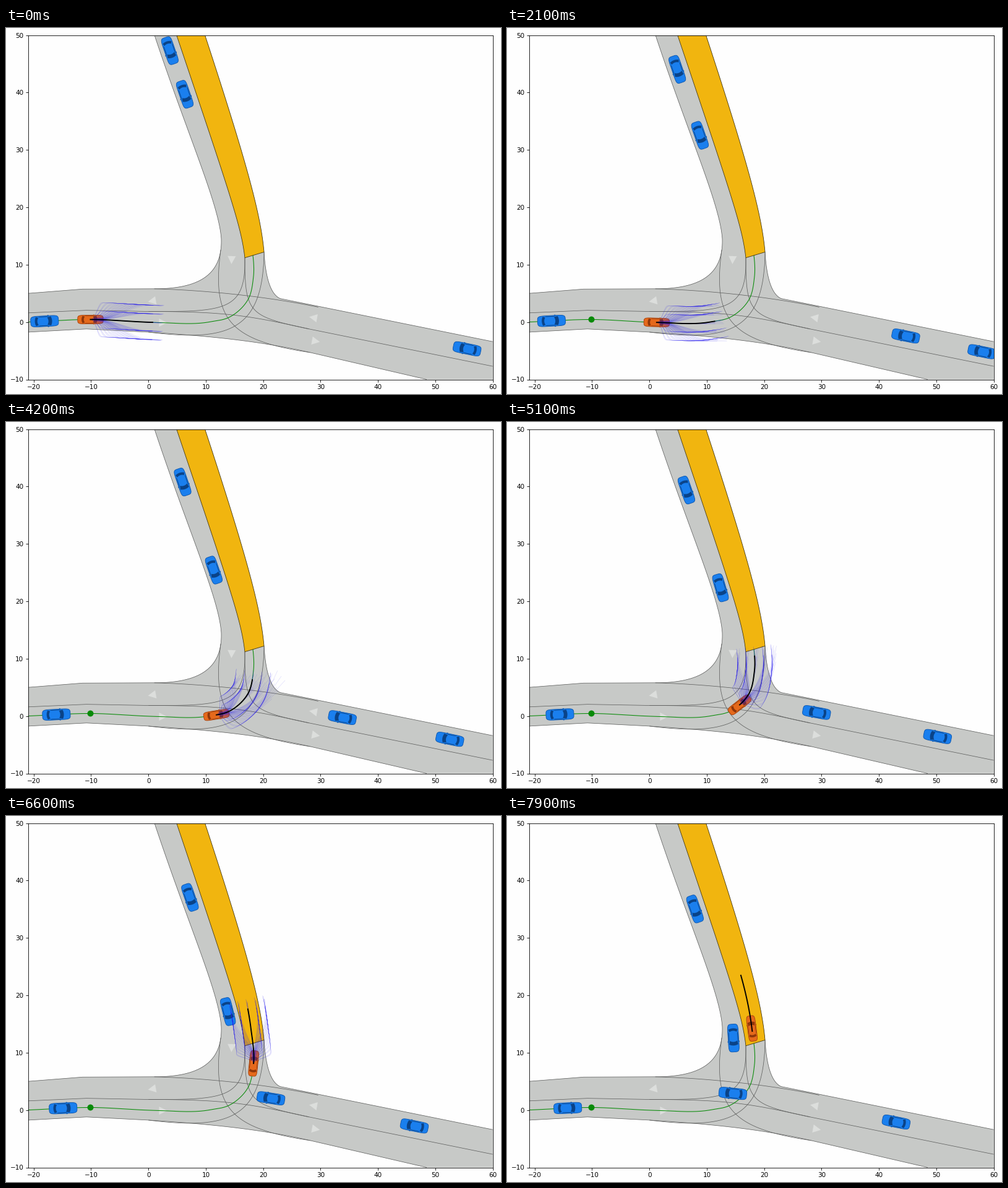
A matplotlib script for the animation above (8 s loop, 800 by 592 pixels).

```python
import numpy as np
import matplotlib.pyplot as plt
from matplotlib.animation import FuncAnimation
from matplotlib.collections import LineCollection
from matplotlib.patches import Polygon
from matplotlib.transforms import Affine2D

FRAMES, STEP = 80, 0.1
REPLAN, HORIZON = 3, 2.0
PX = 72 / 80  # points per pixel

plt.rcParams.update({"font.family": "DejaVu Sans", "font.size": 10.4 * PX})
fig = plt.figure(figsize=(10, 7.4), dpi=80, facecolor="#fefefe")
ax = fig.add_axes([35.5 / 800, 23.5 / 592, 751 / 800, 557 / 592], facecolor="#fefefe")
ax.set(xlim=(-21, 60), ylim=(-10, 50), xticks=range(-20, 61, 10), yticks=range(-10, 51, 10))
ax.tick_params(length=3.6 * PX, pad=3.6 * PX, width=0.85 * PX)
for spine in ax.spines.values():
    spine.set(linewidth=0.85 * PX, zorder=50)


def bezier(*ctrl, n=50):
    """Cubic Bezier curve as an array of points."""
    a, b, c, d = np.array(ctrl, float)
    u = np.linspace(0, 1, n)[:, None]
    return (1 - u) ** 3 * a + 3 * u * (1 - u) ** 2 * b + 3 * u * u * (1 - u) * c + u ** 3 * d


def route(*pts):
    """Smooth curve through pts, as a function of the distance travelled."""
    pts = np.array(pts, float)
    keys = np.r_[0, np.cumsum(np.hypot(*np.diff(pts, axis=0).T))]
    slope = np.gradient(pts, keys, axis=0)
    spans = zip(np.diff(keys)[:, None], pts, pts[1:], slope, slope[1:])
    curve = np.vstack([bezier(p, p + h * m / 3, q - h * k / 3, q, n=120)[:-1]
                       for h, p, q, m, k in spans] + [pts[-1:]])
    dist = np.r_[0, np.cumsum(np.hypot(*np.diff(curve, axis=0).T))]
    return lambda s: np.column_stack([np.interp(s, dist, c) for c in curve.T])


# Road borders
west_top = [(-21, 5), (-11.5, 5.75), (1, 5.8)]
west_mid = [(-21, 1.6), (-10.8, 2.05), (0, 1.85)]
west_low = [(0, -1.75), (-10.8, -1.2), (-21, -1.75)]
north_left = bezier((12.7, 14.5), (12.3, 20.5), (7.05, 32), (1.05, 50))
north_mid = bezier((16.8, 11.2), (16.2, 16.5), (14.5, 21.5), (4.9, 50))
north_right = bezier((20.15, 12.2), (19.6, 18.5), (17.4, 27), (9.85, 50))
nw_corner = bezier((1, 5.8), (8.5, 5.8), (12.9, 8), (12.7, 14.5))
ne_corner = bezier((20.15, 12.2), (20.4, 8), (21.2, 4.9), (22.95, 4.1))
east_top = [(22.95, 4.1), (60, -3.4)]
east_low = np.vstack([(48.5, -10), bezier((28.2, -5.3), (19, -3.2), (10, -2.4), (0, -1.75))])
through = np.vstack([west_mid, bezier((0, 1.85), (14, 1.85), (18, 1), (28, -1.2)), (60, -7.7)])

# Turning lanes across the junction
turns = [
    bezier((1, 5.8), (9, 5.6), (20, 4.6), (29.6, 2.6)),
    bezier((0, 1.85), (13.5, 1.8), (17, 2), (16.8, 11.2)),
    bezier((0, -1.75), (14, -3.5), (20, -1.5), (20.15, 12.2)),
    bezier((16.8, 11.2), (16.8, 1.5), (17.5, 1), (28, -1.2)),
    bezier((12.6, 12.6), (11, 0.5), (14, -3.2), (28.2, -5.3)),
]

outline = [west_top, nw_corner, north_left, north_right[::-1], ne_corner, east_top,
           [(60, -10)], east_low, west_low]
ax.add_patch(Polygon(np.vstack(outline), fc="#c7c9c7", ec="none", zorder=1))
borders = [west_top, nw_corner, north_left, ne_corner, east_top, east_low, west_low, through]
ax.add_collection(LineCollection([np.array(b) for b in borders + turns], colors="#5c5d5c",
                                 linewidths=0.75 * PX, zorder=3))
ax.add_patch(Polygon(np.vstack([north_mid, north_right[::-1]]), fc="#f1b50f", ec="#3d320f",
                     lw=0.8 * PX, zorder=5))

for x, y, deg in [(0.8, 3.7, 190), (2.35, -0.1, 0), (14.5, 11, 268), (28.9, 0.75, 170), (29, -3.3, -10)]:
    tri = Affine2D().rotate_deg(deg).translate(x, y).transform([(-0.5, 0.72), (-0.5, -0.72), (0.9, 0)])
    ax.add_patch(Polygon(tri, fc="#dcdedc", ec="none", zorder=2))

# Routes
ego_way = route((-21.2, 0), (-10.1, 0.45), (1, -0.05), (10.5, 0), (14.1, 0.85), (17.4, 4),
                (18.3, 7.85), (17.85, 14.3), (15.9, 23.6), (13.1, 31.5))
south_way = route((2.8, 50), (8.82, 32.5), (12.4, 22.3), (14.6, 13), (14.5, 6))
west_way = route((66, -6.8), (29, 0.65), (21.35, 2.05), (8, 3.6))
START = 11.1


def ego_dist(t):
    """Slows gently into the turn and picks up speed after it."""
    return START + 5.6 * t - 0.086 * t ** 2 + 0.17 * np.maximum(t - 6.2, 0) ** 2


def steady(start, speed):
    return lambda t: start + speed * t


class Car:
    """Top view of a car, drawn in a unit box and moved along a route."""

    def __init__(self, way, dist, size, colors, reach=(0.5, 0.5), z=20):
        self.way, self.dist, self.size, self.reach = way, dist, size, reach
        body, edge, glass = colors
        a = np.linspace(0, 2 * np.pi, 60)
        shell = np.column_stack([np.sign(f) * np.abs(f) ** p
                                 for f, p in ((np.cos(a), 0.3), (np.sin(a), 0.45))])
        self.parts = [self.part(shell, z + 1, fc=body, ec=edge, lw=0.9 * PX)]
        # panes bulge away from the roof and widen outwards
        for inner, outer in ((0.2, 0.46), (-0.44, -0.62)):
            y = np.linspace(-1, 1, 9)
            bow = np.sign(inner) * 0.08 * (1 - y ** 2)
            pane = np.vstack([np.column_stack([inner + bow, 0.7 * y]),
                              np.column_stack([outer + bow, 0.86 * y])[::-1]])
            self.parts.append(self.part(pane, z + 2, fc=glass, ec="none"))
        for side in (1, -1):
            window = np.array([(-0.36, 0.78), (-0.46, 0.88), (0.36, 0.88), (0.16, 0.78)]) * (1, side)
            mirror = np.array([(0.2, 0.95), (0.22, 1.13), (0.3, 1.13), (0.32, 0.95)]) * (1, side)
            self.parts += [self.part(window, z + 2, fc=glass, ec="none"),
                           self.part(mirror, z, fc=edge, ec="none")]

    @staticmethod
    def part(pts, z, **style):
        return ax.add_patch(Polygon(pts, zorder=z, **style))

    def place(self, t):
        s = self.dist(t)
        rear, mid, front = self.way([s - self.reach[0], s, s + self.reach[1]])
        dx, dy = front - rear
        tr = (Affine2D().scale(self.size[0] / 2, self.size[1] / 2)
              .rotate(np.arctan2(dy, dx)).translate(*mid) + ax.transData)
        for p in self.parts:
            p.set_transform(tr)


BLUE = ("#1a7fee", "#0c57b0", "#0a4388")
ORANGE = ("#e5691b", "#a8420c", "#8f360a")
traffic = [(ego_way, 3.1, 0.49), (south_way, 2.86, 1.64), (south_way, 10.9, 3.6),
           (west_way, 10.68, 5.28), (west_way, 2.7, 2.63)]
cars = [Car(way, steady(s, v), (4.85, 1.85), BLUE) for way, s, v in traffic]
cars.append(Car(ego_way, ego_dist, (4.45, 1.5), ORANGE, reach=(1.6, 0.6), z=24))

# Reference route and its start marker
ax.plot(*ego_way(np.linspace(0, 60, 400)).T, color="#078a07", lw=1.05 * PX, zorder=4)
ax.plot(*ego_way([START]).T, "o", color="#078a07", ms=10 * PX, mew=0, zorder=6)

plan, = ax.plot([], [], color="black", lw=1.9 * PX, zorder=40)
fan = LineCollection([], colors=(0.15, 0.1, 0.95, 0.24), linewidths=0.4 * PX, zorder=30)
ax.add_collection(fan)
tau = np.linspace(0, HORIZON, 41)


def candidate(t0, offset, T, gain):
    """Reach a lateral offset after T seconds; late ones then coast straight on."""
    u = np.clip(tau / T, 0, 1)
    warp = tau + gain * np.where(tau < T, tau * u ** 2 * (1 - u / 2), tau - T / 2)
    s = ego_dist(t0 + warp)
    tangent = ego_way(s + 0.1) - ego_way(s - 0.1)
    tangent /= np.hypot(*tangent.T)[:, None]
    shift = offset * u ** 3 * (10 - 15 * u + 6 * u * u)
    pos = ego_way(s) + shift[:, None] * tangent[:, ::-1] * (-1, 1)
    if T >= 1:
        k = np.searchsorted(tau, T - 1e-9)
        pos[k:] = pos[k] + (tau[k:, None] - tau[k]) * np.gradient(pos, tau, axis=0)[k]
    return pos


def update(i):
    t = i * STEP
    for car in cars:
        car.place(t)
    t0 = i // REPLAN * REPLAN * STEP
    plan.set_data(*ego_way(ego_dist(t0 + tau)).T)
    fan.set_segments([candidate(t0, d, T, g)
                      for d in np.linspace(-3, 3, 5)
                      for T in np.linspace(0.4, 2, 9)
                      for g in (-0.2, 0, 0.2)] if i % REPLAN == 0 else [])
    return []


anim = FuncAnimation(fig, update, frames=FRAMES, interval=100, repeat=True,
                     repeat_delay=0, init_func=lambda: update(0), blit=False)
plt.show()
```
